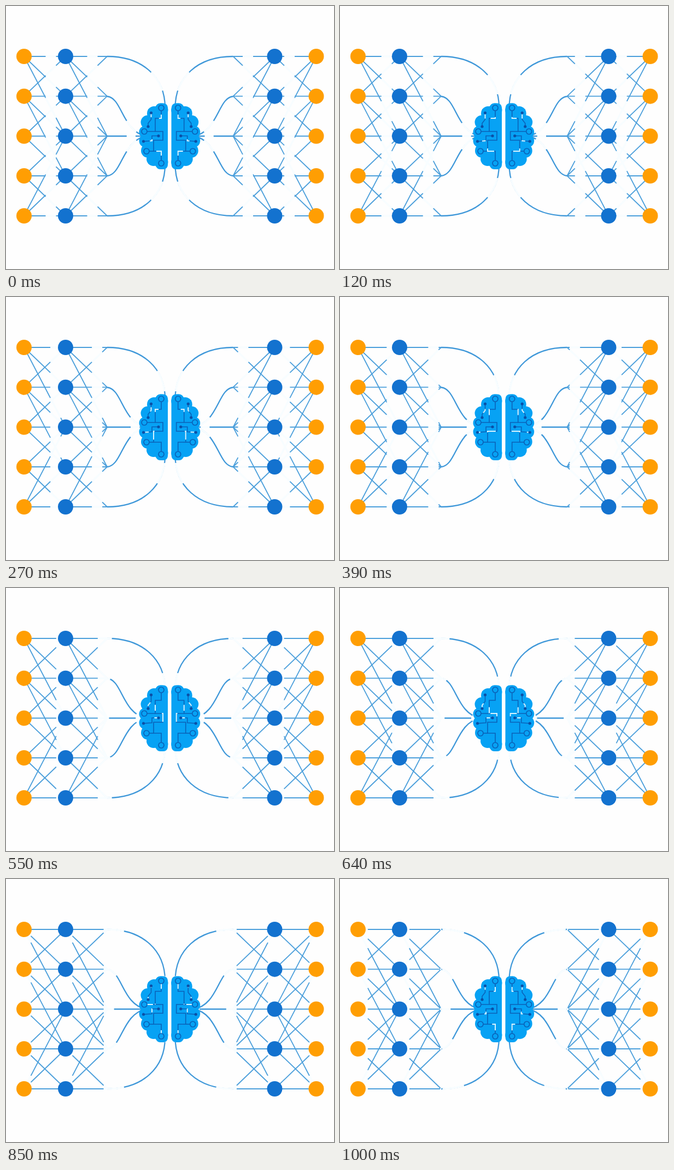
An HTML page that plays this animation: 600 by 480 pixels, repeating every 1030 ms.

```html
<!DOCTYPE html>
<html lang="en">
<head>
<meta charset="utf-8">
<title>Neural network</title>
<style>
  html, body { margin: 0; width: 100%; height: 100%; overflow: hidden; background: #fefefe; }
  svg { display: block; width: 600px; height: 480px; }
  path { fill: none; }
  .link { stroke: #4b9fdb; stroke-width: 1.8; }
  .arc { stroke: #3f98d9; stroke-width: 2.3; }
  .gap { stroke: #f8fdff; stroke-width: 3.4; }
  .lobe { fill: #07a2f4; }
  .trace { stroke: #0b62b8; stroke-width: 1.6; }
  .spark { stroke: #d8f3ff; stroke-width: 2; }
  .ring { fill: #07a2f4; stroke: #0b62b8; stroke-width: 1.7; }
  .dot { fill: #0b4fa6; }
</style>
</head>
<body>
<svg viewBox="0 0 600 480"></svg>
<script>
const LOOP = 1030;
const ROWS = [92, 164.7, 237.5, 310, 383];
const COLS = [33, 109, 185];
const svg = document.querySelector('svg');

function add(parent, tag, attrs) {
  const el = document.createElementNS('http://www.w3.org/2000/svg', tag);
  for (const key in attrs) el.setAttribute(key, attrs[key]);
  return parent.appendChild(el);
}

// A dash that travels along a path; positions are fractions of its length.
function flow(parent, d, cls, start, travel, size) {
  const el = add(parent, 'path', {
    d, class: cls, pathLength: 1, 'stroke-dasharray': `${size} ${1 - size}`
  });
  el.animate(
    [{ strokeDashoffset: -start }, { strokeDashoffset: -(start + travel) }],
    { duration: LOOP, iterations: Infinity, easing: 'steps(34)' }
  );
}

// Every node reaches its neighbours; some also reach two rows away.
const FAR = [0, 1, 4];

function layerLinks(x1, x2) {
  const links = [];
  ROWS.forEach((y1, i) => ROWS.forEach((y2, j) => {
    const span = Math.abs(i - j);
    if (span < 2 || (span === 2 && FAR.includes(i))) links.push(`M${x1} ${y1}L${x2} ${y2}`);
  }));
  return links;
}

const links = [...layerLinks(COLS[0], COLS[1]), ...layerLinks(COLS[1], COLS[2])];

const flip = y => 475 - y;
const same = y => y;
const arcs = [same, flip].flatMap(f => [
  `M185 ${f(92)}C250 ${f(92)} 291 ${f(130)} 291 ${f(186)}`,
  `M185 ${f(165)}C213 ${f(167)} 212 ${f(230)} 258 ${f(238)}`
]);
arcs.push('M185 237.5H250');

function drawNetwork(transform) {
  const g = add(svg, 'g', { transform });
  links.forEach(d => add(g, 'path', { d, class: 'link' }));
  arcs.forEach(d => add(g, 'path', { d, class: 'arc' }));
  links.forEach(d => flow(g, d, 'gap', 0.52, 0.48, 0.25));
  arcs.forEach(d => flow(g, d, 'gap', 0.55, 0.48, 0.25));
  ROWS.forEach(cy => {
    add(g, 'circle', { cx: COLS[0], cy, r: 14, fill: '#ff9e03' });
    add(g, 'circle', { cx: COLS[1], cy, r: 14, fill: '#1372cf' });
  });
}

const LOBES = [
  [284, 190, 12.5], [271, 196, 13], [259, 212, 12.5], [255, 230, 11.5],
  [256, 246, 12.5], [260, 264, 13], [270, 279, 13], [284, 285, 12.5]
];
const RINGS = [[284, 186], [253, 229], [257, 265], [284, 287]];
const DOTS = [[265.5, 195], [260, 220], [251.5, 247], [279, 237]];

// path, dash start, dash size
const TRACES = [
  ['M284 191V205H273V229', 0.15, 0.22],
  ['M265.5 195V207L260 214V220', 0, 0.3],
  ['M284 282V265H270V245H287V229H258', 0.08, 0.15],
  ['M279 237H267V246L251.5 247', 0.5, 0.18]
];

function drawBrain(transform) {
  const g = add(svg, 'g', { transform });
  add(g, 'rect', { x: 260, y: 188, width: 36, height: 100, class: 'lobe' });
  add(g, 'rect', { x: 274, y: 177.5, width: 22, height: 120.5, rx: 8, class: 'lobe' });
  LOBES.forEach(([cx, cy, r]) => add(g, 'circle', { cx, cy, r, class: 'lobe' }));
  TRACES.forEach(([d]) => add(g, 'path', { d, class: 'trace' }));
  add(g, 'path', { d: 'M262 265H270', class: 'trace' });
  TRACES.forEach(([d, start, size]) => flow(g, d, 'spark', start, 1, size));
  RINGS.forEach(([cx, cy]) => add(g, 'circle', { cx, cy, r: 5, class: 'ring' }));
  DOTS.forEach(([cx, cy]) => add(g, 'circle', { cx, cy, r: 2.6, class: 'dot' }));
}

drawNetwork('');
drawNetwork('translate(600.5 0) scale(-1 1)');
drawBrain('');
drawBrain('translate(598.7 0) scale(-1 1)');
</script>
</body>
</html>
```
